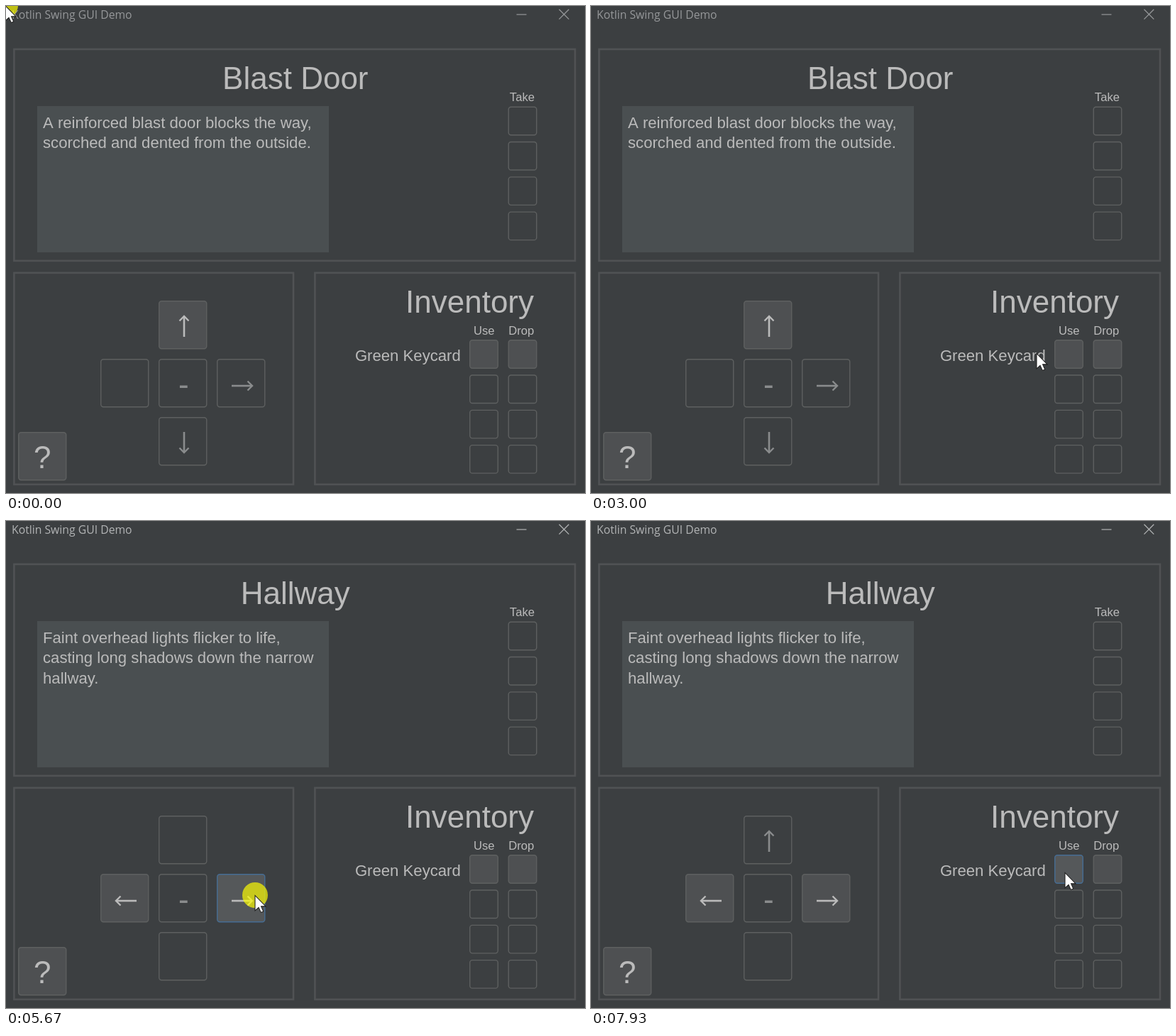
Recreate the animation shown at these times as an HTML page with a canvas. Size 816 by 686 pixels, loop 8 s.

```html
<!DOCTYPE html>
<html lang="en">
<head>
<meta charset="utf-8">
<title>Kotlin Swing GUI Demo</title>
<style>
  html, body { margin: 0; width: 100%; height: 100%; overflow: hidden; background: #3c3f41; }
  canvas { display: block; }
</style>
</head>
<body>
<canvas id="stage" width="816" height="686"></canvas>
<script>
const ctx = document.getElementById('stage').getContext('2d');
const LOOP = 8000, FPS = 15;
const SANS = '"Liberation Sans", Arial, sans-serif';
const BIG = 44, MID = BIG / 2 + 0.15, SMALL = 16.6;
const FG = '#bbbbbb', DIM = '#8a8c8d', BG = '#3c3f41';
const NAV = 68.5, SLOT = 41, SLOT_STEP = 49.3;

// Timeline positions are in ticks of 1/15 s.
const ACTIVATE = 61, UNLOCK = 62, ENTER_HALL = 85, SHOW_UP = 95;
const HOLD = 7, FADE = 5;
const CLICKS = [
  { press: -4, release: -3 },
  { press: ACTIVATE, release: UNLOCK },
  { press: 82, release: 84 }
];

const smooth = u => u * u * (3 - 2 * u);
const easeOut = u => 1 - (1 - u) ** 1.4;
const point = (x, y) => ({ x, y });
const START = point(-1, -1);

// Each glide starts where the one before it ended; bend holds Bezier handles.
const glide = (from, to, end, ease = smooth, ...bend) => ({ from, to, end, ease, bend });
const GLIDES = [
  glide(15, 23, point(295, 463)),
  glide(27, 28, point(303, 465)),
  glide(28, 40, point(562, 499), smooth, point(130, 702), point(155, 702)),
  glide(40, 50, point(668, 483), easeOut),
  glide(68, 75, point(345, 525)),
  glide(77, 80, point(351, 527)),
  glide(90, 103, point(252, 422), smooth, point(290, 440), point(177, 355)),
  glide(103, 109, point(581, 442), smooth, point(229, 480), point(330, 440)),
  glide(112, 119, point(668, 495))
];

const ROOMS = {
  door: {
    title: 'Blast Door',
    lines: ['A reinforced blast door blocks the way,', 'scorched and dented from the outside.']
  },
  hall: {
    title: 'Hallway',
    lines: ['Faint overhead lights flicker to life,', 'casting long shadows down the narrow', 'hallway.']
  }
};

// Exits clockwise from the top: 0 none, 1 locked, 2 open.
function exitsAt(n) {
  if (n < UNLOCK) return '2110';
  if (n < ENTER_HALL) return '2220';
  return n < SHOW_UP ? '0202' : '1202';
}

const mix = (a, b, u) => point(a.x + (b.x - a.x) * u, a.y + (b.y - a.y) * u);

function bezier(a, b, c, d, u) {
  const ab = mix(a, b, u), bc = mix(b, c, u), cd = mix(c, d, u);
  return mix(mix(ab, bc, u), mix(bc, cd, u), u);
}

function pointerAt(n) {
  let pos = START;
  for (const { from, to, end, ease, bend } of GLIDES) {
    if (n <= from) break;
    const u = ease(Math.min(1, (n - from) / (to - from)));
    pos = bend.length ? bezier(pos, ...bend, end, u) : mix(pos, end, u);
  }
  return pos;
}

function text(str, x, y, size, color = FG, align = 'left', family = SANS) {
  ctx.font = `${size}px ${family}`;
  ctx.textAlign = align;
  ctx.fillStyle = color;
  ctx.fillText(str, x, y);
}

function line(color, width, ...pts) {
  ctx.strokeStyle = color;
  ctx.lineWidth = width;
  ctx.beginPath();
  for (let i = 0; i < pts.length; i += 2) ctx.lineTo(pts[i], pts[i + 1]);
  ctx.stroke();
}

function panel(x, y, w, h) {
  ctx.strokeStyle = '#505254';
  ctx.lineWidth = 2.6;
  ctx.strokeRect(x, y, w, h);
}

function button(x, y, size, enabled, { mouse, pressed }) {
  const inside = v => v >= 0 && v < size;
  const hot = enabled && inside(mouse.x - x) && inside(mouse.y - y);
  ctx.beginPath();
  ctx.roundRect(x + 0.75, y + 0.75, size - 1.5, size - 1.5, 3.5);
  ctx.fillStyle = !enabled ? BG : !hot ? '#4e5052' : pressed ? '#5c5f61' : '#55585a';
  ctx.fill();
  ctx.strokeStyle = hot ? '#466d94' : '#5e6060';
  ctx.lineWidth = 1.4;
  ctx.stroke();
}

function slots(x, y, state, filled = 0) {
  for (let i = 0; i < 4; i++) button(x, y + SLOT_STEP * i, SLOT, i < filled, state);
}

// Arrow centred on (x, y), pointing up before rotation.
function arrow(x, y, turns, color) {
  ctx.save();
  ctx.translate(x, y);
  ctx.rotate(turns * Math.PI / 2);
  line(color, 2.6, 0, 15, 0, -13);
  line(color, 2.4, -6.5, -7.5, 0, -14, 6.5, -7.5);
  ctx.restore();
}

function titleBar(active) {
  const color = active ? '#b2b4b5' : '#96989a';
  text('Kotlin Swing GUI Demo', 8, 18.3, 15.75, color, 'left', '"Open Sans", "Noto Sans", sans-serif');
  line(color, 1.2, 719.5, 12, 733.5, 12);
  line(color, 1.3, 779.5, 4.8, 793.3, 18.6);
  line(color, 1.3, 793.3, 4.8, 779.5, 18.6);
}

function roomPanel(room, state) {
  panel(11.4, 60.9, 790.6, 298);
  text(room.title, 407.8, 117, BIG, FG, 'center');
  ctx.fillStyle = '#4a4f51';
  ctx.fillRect(44, 141, 411, 206);
  room.lines.forEach((s, i) => text(s, 52, 171.7 + 28.6 * i, MID));
  text('Take', 727.4, 134, SMALL, FG, 'center');
  slots(707.5, 141.5, state);
}

function navPanel(n, state) {
  const x = 215, y = 497, gap = 82;
  panel(11.4, 375.9, 393.6, 298);
  [...exitsAt(n)].forEach((exit, turns) => {
    const angle = turns * Math.PI / 2, open = exit === '2';
    const bx = x + gap * Math.sin(angle), by = y - gap * Math.cos(angle);
    button(bx, by, NAV, open, state);
    if (exit !== '0') arrow(bx + 36, by + (turns % 2 ? 38 : 36), turns, open ? FG : DIM);
  });
  button(x, y, NAV, false, state);
  text('-', 250.3, 548, BIG, DIM, 'center');
  button(17, 600, NAV, true, state);
  text('?', 51.3, 650.6, BIG, FG, 'center');
}

function inventoryPanel(state) {
  panel(435.4, 375.9, 366.6, 298);
  text('Inventory', 744, 432, BIG, FG, 'right');
  text('Use', 673.7, 462.5, SMALL, FG, 'center');
  text('Drop', 726.2, 462.5, SMALL, FG, 'center');
  text('Green Keycard', 640.8, 500, MID, FG, 'right');
  slots(653, 470, state, 1);
  slots(707.5, 470, state, 1);
}

function highlight(n) {
  for (const { press, release } of CLICKS) {
    const left = 1 - (n - release - HOLD + 1) / FADE;
    if (n < press || left <= 0) continue;
    const { x, y } = pointerAt(press);
    ctx.fillStyle = `rgba(255, 255, 0, ${0.68 * Math.min(1, left)})`;
    ctx.beginPath();
    ctx.arc(x, y, 18, 0, Math.PI * 2);
    ctx.fill();
  }
}

const POINTER = new Path2D('M0 0V17L4 13.3L6.6 19L9.3 17.8L6.8 12.2H12Z');

function pointer({ x, y }) {
  ctx.save();
  ctx.translate(Math.round(x), Math.round(y) + 0.5);
  ctx.scale(1.26, 1.26);
  ctx.fillStyle = '#ffffff';
  ctx.fill(POINTER);
  ctx.strokeStyle = '#1c1c1c';
  ctx.lineWidth = 0.8;
  ctx.stroke(POINTER);
  ctx.restore();
}

function draw(ms) {
  const n = Math.floor(ms * FPS / 1000 + 0.05);
  const state = {
    mouse: pointerAt(n),
    pressed: CLICKS.some(c => n >= c.press && n <= c.release)
  };
  ctx.fillStyle = BG;
  ctx.fillRect(0, 0, 816, 686);
  titleBar(n >= ACTIVATE);
  roomPanel(n >= ENTER_HALL ? ROOMS.hall : ROOMS.door, state);
  navPanel(n, state);
  inventoryPanel(state);
  highlight(n);
  pointer(state.mouse);
}

const start = performance.now();
function tick() {
  draw((performance.now() - start) % LOOP);
  requestAnimationFrame(tick);
}
tick();
</script>
</body>
</html>
```
